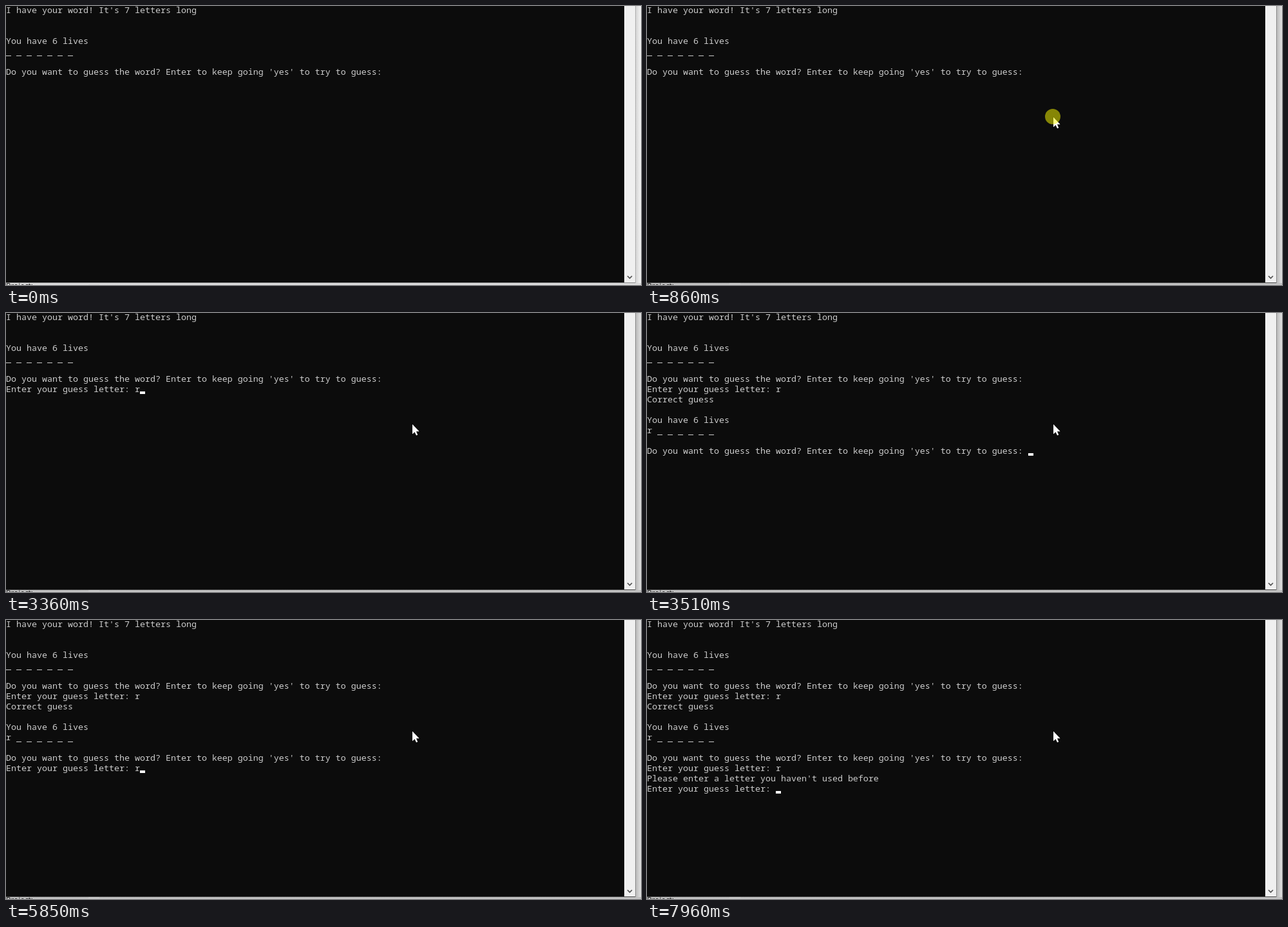
Recreate the animation shown at these times as an HTML page with a canvas. Size 986 by 434 pixels, loop 8 s.

```html
<!DOCTYPE html>
<html lang="en">
<head>
<meta charset="utf-8">
<title>Word guessing console</title>
<style>
  html, body { margin: 0; width: 100%; height: 100%; overflow: hidden; background: #0c0c0c; }
  canvas { display: block; }
</style>
</head>
<body>
<canvas id="stage" width="986" height="434"></canvas>
<script>
const ctx = document.getElementById('stage').getContext('2d');
const W = 986, H = 434, LOOP = 8000;
const COL = 8, ROW = 16, TOP = -2;
const CONSOLE_W = 960, BAR_END = 977, CONSOLE_H = 430;
const FONT = '13.333px "Noto Sans Mono", "DejaVu Sans Mono", monospace';

const ASK = "Do you want to guess the word? Enter to keep going 'yes' to try to guess:";
const LETTER = 'Enter your guess letter: ';
const LIVES = 'You have 6 lives';

// [time, row, text]
const lines = [
  [0, 0, "I have your word! It's 7 letters long"],
  [0, 3, LIVES],
  [0, 4, '_ _ _ _ _ _ _'],
  [0, 6, ASK],
  [2500, 7, LETTER],
  [3360, 7, LETTER + 'r'],
  [3510, 8, 'Correct guess'],
  [3510, 10, LIVES],
  [3510, 11, 'r _ _ _ _ _ _'],
  [3510, 13, ASK],
  [4290, 14, LETTER],
  [5850, 14, LETTER + 'r'],
  [6160, 15, "Please enter a letter you haven't used before"],
  [6160, 16, LETTER],
  [7640, 16, LETTER + 'e'],
  [7960, 16, LETTER]
];

// [time, column, row]; a bare time hides the caret
const caret = [
  [0], [1410, 74, 6], [1870], [2420, 0, 7], [2500, 25, 7], [3360, 26, 7],
  [3510, 74, 13], [4290, 25, 14], [5060], [5610, 25, 14], [5850, 26, 14],
  [6160, 25, 16], [7170], [7640, 26, 16], [7720], [7960, 25, 16]
];

const MOVE = { from: 150, to: 780, step: 79, x0: 880, y0: 428, x1: 631, y1: 173 };
const CLICK = [780, 940];

function rect(color, x, y, w, h) {
  ctx.fillStyle = color;
  ctx.fillRect(x, y, w, h);
}

function fade(x0, y0, x1, y1, a, b) {
  const g = ctx.createLinearGradient(x0, y0, x1, y1);
  g.addColorStop(0, a);
  g.addColorStop(1, b);
  return g;
}

function drawWindow(focused) {
  const edge = focused ? '#b4b4b4' : '#d0d0d0';
  const far = focused ? '#e2e2e2' : '#f6f6f6';
  rect(fade(0, CONSOLE_H, 0, H + 4, edge, far), 0, CONSOLE_H, W, H - CONSOLE_H);
  rect(fade(BAR_END, 0, W, 0, edge, far), BAR_END, 0, W - BAR_END, CONSOLE_H + 1);
  rect(focused ? '#c9c9c9' : '#dadada', 128, 431, 17, 3);
  ctx.font = '12px "Open Sans", sans-serif';
  ctx.fillStyle = '#222';
  ctx.fillText('Project:', 0, 440);

  rect('#0c0c0c', 0, 0, CONSOLE_W, CONSOLE_H);
  rect('#f0f0f0', CONSOLE_W, 0, BAR_END - CONSOLE_W, CONSOLE_H);
  rect(focused ? '#4c4c4c' : '#8a8a8a', 0, CONSOLE_H, BAR_END, 1);
  rect(focused ? '#8c8c8c' : '#b0b0b0', BAR_END, 0, 1, CONSOLE_H + 1);

  ctx.strokeStyle = '#505050';
  ctx.lineWidth = 1.7;
  ctx.beginPath();
  ctx.moveTo(965, 420);
  ctx.lineTo(968.5, 423.5);
  ctx.lineTo(972, 420);
  ctx.stroke();
}

function drawLine(row, text) {
  const y = TOP + row * ROW;
  ctx.fillStyle = '#ccc';
  ctx.fillText(text.replace(/_/g, ' '), 0, y + 13);
  // blanks sit on the last pixel line of the cell
  for (let i = 0; i < text.length; i++)
    if (text[i] === '_') ctx.fillRect(i * COL, y + 15, COL, 1);
}

function drawText(t) {
  const rows = new Map();
  for (const [at, row, text] of lines) if (t >= at) rows.set(row, text);
  ctx.font = FONT;
  rows.forEach((text, row) => drawLine(row, text));

  const [, col, row] = caret.filter(c => t >= c[0]).pop();
  if (row !== undefined) rect('#fff', col * COL, TOP + row * ROW + 12, COL, 4);
}

function drawPointer(t) {
  if (t < MOVE.from) return;
  const held = MOVE.from + Math.floor((t - MOVE.from) / MOVE.step) * MOVE.step;
  const p = Math.min(1, (held - MOVE.from) / (MOVE.to - MOVE.from - MOVE.step));
  const k = 1 - (1 - p) ** 2;
  const x = Math.round(MOVE.x0 + (MOVE.x1 - MOVE.x0) * k);
  const y = Math.round(MOVE.y0 + (MOVE.y1 - MOVE.y0) * k);

  ctx.beginPath();
  [[0, 0], [0, 15.5], [3.6, 12.2], [6, 17.6], [8.3, 16.6], [6, 11.3], [10.8, 11.3]]
    .forEach(([dx, dy]) => ctx.lineTo(x + dx, y + dy));
  ctx.closePath();
  ctx.strokeStyle = '#000';
  ctx.lineWidth = 1.5;
  ctx.stroke();
  ctx.fillStyle = '#fff';
  ctx.fill();

  if (t >= CLICK[0] && t < CLICK[1]) {
    ctx.fillStyle = 'rgba(255, 255, 0, 0.5)';
    ctx.beginPath();
    ctx.arc(630, 172, 12, 0, Math.PI * 2);
    ctx.fill();
  }
}

function draw(t) {
  drawWindow(t >= CLICK[0]);
  drawText(t);
  drawPointer(t);
}

const start = performance.now();
function tick() {
  draw((performance.now() - start) % LOOP);
  requestAnimationFrame(tick);
}
tick();
</script>
</body>
</html>
```
